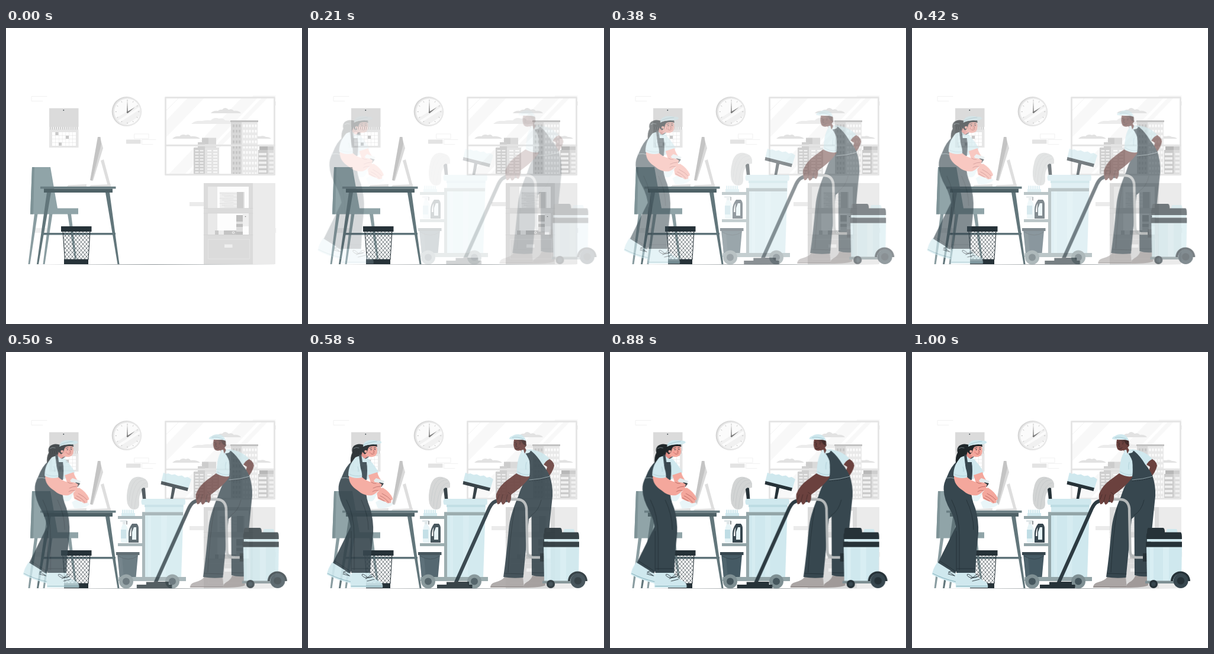
Recreate the animation shown at these times as an HTML page with a canvas. Size 500 px wide and 500 px high, loop 1040 ms.

```html
<!DOCTYPE html>
<html lang="en">
<head>
<meta charset="utf-8">
<title>Office cleaning</title>
<style>
html, body { margin: 0; width: 100%; height: 100%; overflow: hidden; background: #fff; }
canvas { display: block; width: 500px; height: 500px; }
</style>
</head>
<body>
<canvas id="stage"></canvas>
<script>
const SIZE = 500, LOOP = 1040, SHIFT = 22;
const scale = window.devicePixelRatio || 1;
const INK = '#263238', SLATE = '#37474f', SEAM = '#222f35', BLUE = '#cfe8ee', PALE = '#d8eef3',
  STEEL = '#93a5a8', PINK = '#f4a79c', ROSE = '#e58f88', BROWN = '#6b413e', UMBER = '#432b2a', SHOE = '#aaa5a4';
let c;

const fill = (color, d) => { c.fillStyle = color; c.fill(new Path2D(d)); };
const box = (color, x, y, x2, y2) => { c.fillStyle = color; c.fillRect(x, y, x2 - x, y2 - y); };
const disc = (color, x, y, r) => { c.fillStyle = color; c.beginPath(); c.arc(x, y, r, 0, 7); c.fill(); };
const line = (color, w, d) => { c.strokeStyle = color; c.lineWidth = w; c.stroke(new Path2D(d)); };
const frame = (color, w, x, y, x2, y2) => { c.strokeStyle = color; c.lineWidth = w; c.strokeRect(x, y, x2 - x, y2 - y); };
function grid(color, x, y, cols, rows, dx, dy, w, h) {
  for (let i = 0; i < cols; i++)
    for (let j = 0; j < rows; j++) box(color, x + i * dx, y + j * dy, x + i * dx + w, y + j * dy + h);
}
function clipped(d, draw) {
  c.save(); c.clip(new Path2D(d)); draw(); c.restore();
}
function prepare(canvas) {
  canvas.width = canvas.height = SIZE * scale;
  const ctx = canvas.getContext('2d');
  ctx.scale(scale, scale);
  ctx.lineCap = ctx.lineJoin = 'round';
  return ctx;
}
function layer(...parts) {
  const canvas = document.createElement('canvas');
  c = prepare(canvas);
  parts.forEach(part => part());
  return canvas;
}

function calendar() {
  box('#dbdbdb', 73, 135.5, 122.5, 167);
  box('#e6e6e6', 73, 171, 122.5, 202);
  box('#f2f2f2', 73, 167, 122.5, 171);
  grid('#c7c7c7', 74, 167, 14, 1, 3.5, 1, 1.5, 4.5);
  grid('#fff', 78, 176, 7, 4, 5.8, 5.9, 5.2, 5.3);
  box('#c7c7c7', 83.5, 176, 88.5, 181);
  box('#c7c7c7', 101, 182, 106, 187);
  box('#c7c7c7', 89, 193.5, 94, 198.7);
  disc(INK, 97.3, 138.8, .9);
}

function clock() {
  disc('#d6d6d6', 203.6, 141, 25);
  disc('#e8e8e8', 205, 141.4, 24.2);
  disc('#fbfbfb', 205, 141.4, 22);
  clipped('M183 141.4a22 22 0 1 0 44 0a22 22 0 1 0-44 0', () => {
    line('#f1f1f1', 5, 'M182 158L226 130');
    line('#f1f1f1', 9, 'M190 166L234 138');
  });
  for (let i = 0; i < 12; i++) {
    const a = i * Math.PI / 6, x = Math.cos(a), y = Math.sin(a);
    line('#b5b5b5', .8, `M${205 + x * 18.5} ${141.4 + y * 18.5}L${205 + x * 20} ${141.4 + y * 20}`);
  }
  fill('#8a8a8a', 'M204 143L205 121.5L206 143Z');
  fill('#777', 'M204.2 142L217.5 134L205.5 144Z');
  disc('#777', 205, 142.5, 1.2);
}

function city() {
  box('#ccc', 331, 185.5, 342, 198); box('#dadada', 342, 185.5, 355, 198);
  box('#cfcfcf', 324, 193, 336, 203); box('#dedede', 336, 196, 355, 203);
  box('#cfcfcf', 317, 202, 336.5, 247); box('#e3e3e3', 336.5, 202, 360, 247);
  grid('#efefef', 319.5, 206, 2, 8, 8, 5.2, 6, 2.4);
  grid('#f8f8f8', 340, 206, 2, 8, 10, 5.2, 7, 2.4);

  box('#d8d8d8', 380, 158, 398, 247); box('#e9e9e9', 398, 158, 425, 247);
  box('#c2c2c2', 379, 156, 426, 159);
  grid('#c6c6c6', 383, 163, 3, 10, 5, 9, 3, 4.5);
  grid('#fbfbfb', 400.5, 163, 5, 10, 5, 9, 3, 4.5);

  box('#b8b8b8', 428, 200, 442, 207); box('#cecece', 442, 200, 452, 207);
  box('#cacaca', 426, 206, 442, 247); box('#dcdcdc', 442, 206, 452, 247);
  grid('#f0f0f0', 427, 211, 1, 5, 1, 7.3, 13, 4);
  grid('#f0f0f0', 444.5, 211, 1, 5, 1, 7.3, 7.5, 4);
}

function windowPane() {
  clipped('M268 116H455V249H268Z', () => {
    fill('#f8f8f8', 'M309 116H337L268 187V159Z');
    fill('#f8f8f8', 'M400 116H427L300 249H273Z');
    fill('#f8f8f8', 'M434 116H444L316 249H306Z');
    line('#f3f3f3', 1, 'M268 142L294 116');
    fill('#e2e2e2', 'M346 144Q350 139 358 140Q362 137 365 138Q370 132 376 138Q382 136 385 140Q393 139 397 144Z');
    fill('#ececec', 'M313 162Q319 156 331 157Q340 155 346 156Q351 150 360 153Q367 151 370 156Q384 156 392 162Z');
    fill('#e2e2e2', 'M281 187Q286 182 293 183Q297 178 304 181Q309 178 312 183Q322 182 328 187Z');
    fill('#e2e2e2', 'M418 187Q422 182 429 183Q435 181 439 184Q445 184 448 187Z');
    city();
  });
  frame('#e6e6e6', 3, 269.5, 117.5, 453.5, 247.8);
  box('#e4e4e4', 268, 196.8, 455, 199.8);
  box('#f2f2f2', 455, 124, 456.2, 131);
}

function cabinet() {
  box('#dbdbdb', 334, 262, 417, 399); box('#ebebeb', 417, 262, 455, 399);
  box('#fdfdfd', 341, 268, 410, 304.5); box('#e9e9e9', 341, 268, 357, 304.5);
  box('#fdfdfd', 341, 313, 410, 349); box('#e9e9e9', 341, 313, 357, 349);
  box('#efefef', 361, 277, 390, 304.5);
  for (let i = 0; i < 9; i++) line('#d6d6d6', .6, `M${361 + i % 3 * 4} ${279 + i * 2.9}L${390 - i % 2 * 6} ${280 + i * 2.9}`);
  box('#cdcdcd', 390, 277, 401, 304.5); box('#e4e4e4', 401, 277, 403, 304.5);
  box('#c9c9c9', 353, 342, 359, 349); box('#ececec', 359, 342, 368, 349);
  box('#c4c4c4', 368, 342, 389, 349);
  disc('#fafafa', 384, 345.5, 2); disc('#aaa', 384, 345.5, 1);
  box('#bfbfbf', 389, 316, 400, 349); box('#e2e2e2', 389, 327, 400, 331); box('#ddd', 389, 336, 400, 344);
  box('#efefef', 400, 314, 410, 335); disc('#777', 404.5, 318.5, .8);
  line('#d0d0d0', .6, 'M334 304.5H417M334 313H417M334 349.5H417');
  frame('#e6e6e6', .8, 342, 357, 411.5, 390);
  box('#efefef', 369, 365.5, 382.5, 371);
  box('#f0f0f0', 455, 338, 456.2, 346);
}

function bricks() {
  line('#f1f1f1', 1, 'M69 115.5H43V123.5H62');
  frame('#f1f1f1', 1, 217, 179, 241, 187);
  line('#f1f1f1', 1, 'M253 188.5H229.5V196.5H248');
  box('#e3e3e3', 203, 188.5, 227.5, 195.5);
  box('#ebebeb', 310, 294, 334, 301);
  box('#efefef', 48, 338, 70, 346);
  line('#efefef', 1, 'M417 115H455');
}

function chair() {
  fill('#8a9da1', 'M48 314H53.5L40.5 399H37.5ZM73 314H78.5L65.5 399H62.5ZM104 314H110L119 390H116Z');
  fill('#90a4a8', 'M44 235H75L87 304.5H122V314.5H41Z');
  fill('#7e9397', 'M44 235H48L46 314.5H41Z');
}

function desk() {
  fill('#dedede', 'M160 224L165 222L177 267H172Z');
  fill('#dadada', 'M158.5 184L164 203L147 258L143 257Z');
  fill('#c4c4c4', 'M155 184H159.5L161 196L145.5 258L142 257Z');
  fill('#e0e0e0', 'M141 268L143 265.5L177 264V268ZM103 268L105 265.5L136 264V268Z');
  box('#5f747a', 62, 346, 185, 349.5);
  fill('#62767b', 'M69 278H76L55 399H52ZM168 278H175L191.5 399H188.5Z');
  box('#6a7e83', 58, 267.8, 185.5, 271.5);
  box('#4f6267', 64, 271.5, 180, 278);
}

function bin() {
  clipped('M96 344H142L139 391H99Z', () => {
    for (let x = 40; x < 200; x += 6) line(INK, .65, `M${x} 344l47 55M${x} 344l-47 55`);
  });
  line(INK, 1, 'M96 344L99.5 391M142 344L139 391');
  box(INK, 93, 335, 144.5, 344);
  box(INK, 98, 390.5, 139, 399);
}

function room() {
  box('#fff', 0, 0, SIZE, SIZE);
  bricks(); windowPane(); calendar(); clock(); cabinet();
  fill(INK, 'M40 399.25L250 399L462 399.25L250 399.6Z');
  chair(); desk(); bin();
}

function wheel(x, y, r, color, hub) {
  disc(color, x, y, r); disc(hub, x, y, r * .5);
}

function cart() {
  // mop and broom
  fill('#d2d4d4', 'M240 222Q238 213 226 211Q212 209 207 225Q202 243 205 256Q209 267 218 266Q226 265 225 254Q224 243 229 236Q232 230 240 229Z');
  line('#bfc3c4', .6, 'M235 216Q214 215 212 261M237 221Q221 222 217 264M228 213Q211 214 208 252');
  fill(INK, 'M229 232Q231 228 235 230L236.5 249H231Z');
  fill(INK, 'M281 227L286.5 228L282 249H277.5Z');
  fill(BLUE, 'M266 203.5L270 206L274 205L280 207.5L285 206.5L291 209.5L297 208.5L302 212L307 211L313 215L308 231L262 220Z');
  fill(INK, 'M262.5 218L308 229.5L306.5 235L261.5 223.5Z');
  // barrel
  fill(BLUE, 'M235 258H300L296 381H235Z');
  fill('#d6ecf1', 'M240 276H245V381H240ZM262 276H272L270 381H262Z');
  box('#bddce3', 234, 258, 299.5, 262);
  fill(BLUE, 'M230 248H302Q304 253 302 258H230Q227 253 230 248Z');
  box(STEEL, 230, 270.5, 299, 276); box(STEEL, 230, 270.5, 235, 381);
  // shelves
  box(STEEL, 189, 277, 230, 282); box(STEEL, 189, 323, 230, 328);
  box(BLUE, 195, 272, 218, 277);
  grid(BLUE, 196, 266.5, 7, 1, 3, 1, 2, 6);
  fill('#e6f4f7', 'M197 291H202Q206 297 207 304V320Q207 322 205 322H196Q194 322 194 320V304Q194 297 197 291Z');
  box('#bfdde5', 194, 300, 203, 315);
  fill('#dfe6e8', 'M193 284H204L206 287H202V291H197V287H193Z');
  line(INK, 1, 'M204 286V291');
  fill(SLATE, 'M213 290H221Q224 293 224 298V322H207V306Q207 298 213 290Z');
  fill('#e6f4f7', 'M216 296H220V317H213V304Z');
  fill('#fff', 'M212.5 296Q209 301 209 311H211.5V303Z');
  // bucket
  fill('#455a64', 'M188 342H223L219.5 381H192Z');
  fill('#4f646d', 'M190 346H196L199 381H192Z');
  box(SLATE, 186, 338, 225.5, 343);
  line(SLATE, 1, 'M190 345Q207 355 222 345');
  box(STEEL, 190, 380, 304, 387);
  wheel(203, 387.5, 12, '#7e8f93', '#46575e');
  wheel(281, 387.5, 12, '#7e8f93', '#46575e');
}

function vacuum() {
  line('#b4b8b9', 4.4, 'M336 249H351Q365 249 367 264L368.5 336Q368.5 347 379 347H394');
  box(INK, 390, 340, 398, 354);
  fill(BLUE, 'M396 328H456L455 387H397Z');
  fill(PALE, 'M402 330H408V386H402ZM424 330H434V386H424Z');
  fill(INK, 'M399 297H424Q427 297 427 305H397Q397 299 399 297Z');
  fill(BLUE, 'M431 299H447L449 305H429Z');
  fill(INK, 'M398 304.5H454Q456 305 456 316H396Q395 306 398 304.5Z');
  box(BLUE, 397, 316, 455, 320.5);
  box(INK, 395, 320.5, 456, 329.5);
  box('#7e8f93', 394, 386.5, 446, 391);
  wheel(408, 392, 7, INK, SLATE);
  fill(INK, 'M437 387A16.5 16.5 0 0 1 470 387H466A12.5 12.5 0 0 0 441 387Z');
  wheel(454, 386.5, 12.5, SLATE, INK);
}

function wand() {
  line('#2d3b42', 6, 'M247.5 390L304 264Q310 251 322 250.5H334');
  box(INK, 216, 393, 275.5, 399); box(INK, 232, 388.5, 263, 394); box(INK, 247, 388, 270, 393);
}

function man() {
  // far arm and shoes
  fill(BROWN, 'M399 177Q413 183 414 192Q412 202 402 214L396 210Q401 200 402 194L393 188Z');
  fill(BLUE, 'M372 164Q396 168 406 181Q400 183 395 192L382 184Z');
  fill('#a09a99', 'M377 378H397L399 394Q392 398 362 398Q361 393 367 389Q375 385 377 378Z');
  fill(SHOE, 'M330 380H361L363 398H306Q306 391 314 389Q326 386 330 380Z');
  line('#8b8584', 1, 'M307 396.5H362');
  // trousers
  fill(SLATE, 'M372 210L406 208Q412 226 411 244Q406 290 398 379Q386 380 376 377L375.5 278L371 282L361.5 381Q344 383 328 380Q333 345 337 300Q339 276 353 244Q362 216 372 210Z');
  line(SEAM, .8, 'M347 264Q339 310 336 372M330 374L362 375M377 373L398 373M375 276Q388 268 392 250');
  // shirt and bib
  fill(BLUE, 'M359 168Q365 163 374 165Q385 169 387 186L378 210H350Q351 180 359 168Z');
  fill(SLATE, 'M362 167L366 166L375 167Q386 176 394 190Q402 199 407 211Q392 213 371 217Q374 198 372 184Q369 175 362 167Z');
  line('#9fb0b5', .8, 'M372 216Q390 215 407 210');
  c.setLineDash([2, 2]); line(INK, .8, 'M372 218Q390 217 407 212'); c.setLineDash([]);
  fill(BLUE, 'M358 170Q366 175 369 186Q374 196 372 210Q360 212 351 205Q351 180 358 170Z');
  line('#a4c7d0', .7, 'M352 202Q361 209 372 207M367 186Q365 192 366 198');
  // head
  fill(UMBER, 'M361 148H365L367 158L363 163Z');
  fill(BROWN, 'M346 148Q344 157 347 164Q350 168 357 166L359 169L364 172L367 166L364 161Q368 157 365 152L362 149Z');
  fill(UMBER, 'M348 149L365 148Q368 153 365 158Q360 155 359 151Z');
  line(UMBER, 1, 'M347 152.5L350 152M355 152L358 153M350 155L349 159L351 159.5M349 163Q352 164 355 162');
  disc('#241817', 349.5, 155, .7); disc('#241817', 356, 155, .7);
  fill(PALE, 'M358 166L362 165L364 172L360 174ZM364 172L367 165L374 167L372 170Z');
  fill(BLUE, 'M343 142Q347 138.5 354 139Q364 140 366 150Q357 146 345 148L338 147Q338 143 343 142Z');
  line('#9cc3cd', .8, 'M343 144.5Q352 142.5 362 147');
}

function grip() {
  fill(BROWN, 'M350 205Q361 212 373 210Q365 224 341 241Q342 250 338 255Q334 254 333 249Q332 256 327 258Q325 256 324 252Q322 258 318 257Q315 248 316 240Q321 226 335 216Z');
  line(UMBER, .8, 'M333 249L335 241M324 252L327 241M318 249L321 241M341 241L336 237');
}

function woman() {
  // rear foot and leg
  fill(BLUE, 'M43 355L75 375L74 391Q50 385 34 376Q35 366 43 355Z');
  line('#7ba9b4', .9, 'M35 374Q52 383 74 388');
  line(INK, .9, 'M62 371l10 7M61 375l11 3M66 370q7-3 8 1q-2 4-8-1q-7 2-3 4');
  fill(SLATE, 'M60 250Q71 270 75 293L44 356L73 374L92 330L97 280Z');
  // front foot and leg
  fill(BLUE, 'M76 373H106Q111 382 124 388Q129 391 128 398H74Q73 385 76 373Z');
  line('#7ba9b4', .9, 'M75 395.5H128');
  line(INK, .9, 'M99 383l11-4M102 387l12-3M103 381q-10-9-10-4q3 5 10 4q8-9 10-4q-2 5-10 4');
  fill(SLATE, 'M77 184Q66 192 59 211Q53 222 53.5 232Q54 249 65 268Q73 282 75 303L75 373H107Q108 340 112 306Q113 285 107 264Q98 244 100 218L92 190Z');
  line(SEAM, .8, 'M67 250Q80 275 80 312V368M75 303V370M76 366H107M92 250Q104 275 104 300M47 353L73 370');
  // ponytail
  fill('#1f2629', 'M97 157Q86 153 79 159Q75 164 77 170Q73 177 74 188Q83 187 88 179Q96 177 98 168Z');
  line('#8f9ea3', .7, 'M79 163Q83 160 88 162');
  // torso
  fill(BLUE, 'M82 178Q90 173 102 178Q114 190 121 203L103 215L72 211Q73 188 82 178Z');
  fill(SLATE, 'M88 174L92 173L94 186H101Q103 200 101 216H84Q91 205 90 191Z');
  line('#9fb0b5', .8, 'M57 213Q66 211 74 214');
  fill(BLUE, 'M101 184Q113 190 121 204Q114 208 104 208Z');
  // neck and head
  fill(ROSE, 'M94 168L104 172L102 179L97 180L92 175Z');
  fill(PINK, 'M97 160L117 157Q121 170 116 175Q110 179 103 176Q97 174 95 168Z');
  fill('#1f2629', 'M95 158L118 155L119 160Q112 158 106 160Q103 162 102 169L98 173L94 169Z');
  disc(PINK, 99.5, 168, 2.3);
  disc(INK, 108.5, 165, .9); disc(INK, 115, 164.5, .9);
  line(INK, .8, 'M106 162.5l4-.8M113 162l3-.4');
  line('#a64e4b', .8, 'M112 165l2 4l-2 .5M108 171.5Q111 174 114 171');
  disc('#ee918c', 106.5, 169.5, 1.6);
  fill(BLUE, 'M95 160Q95 151 105 149Q113 148 118 150Q125 149 126.5 153Q121 157 113 156Q102 156 95 160Z');
  line('#9cc3cd', .8, 'M96 157Q105 152 118 151');
  // cloth, bottle and hands
  fill(PINK, 'M104 208L119 203Q121 212 129 221L123 232L108 221Z');
  fill('#e9f5f8', 'M116 254Q125 246 138 250L146 257Q139 265 120 264Z');
  fill(PINK, 'M118 238L128 229Q140 236 145 247Q145 251 142 250Q144 256 139 255Q137 257 133 253Q128 252 120 248Z');
  line('#aa5753', .7, 'M127 239Q137 244 142 250M124 243Q133 247 138 254M121 246L131 252');
  fill('#e6f4f7', 'M118 221L124 226L115 247Q111 255 103 251Q100 248 103 242Z');
  fill('#e0e9eb', 'M113 217L117 213L131 218L129 222L120 221L117 224Z');
  fill(INK, 'M122 220L130 222L126 228Z');
  fill(PINK, 'M71 209Q80 213 92 210Q98 217 109 220Q119 219 126 223Q128 226 124 227L127 231Q126 235 121 234Q117 239 110 242Q97 244 86 234Q70 224 71 209Z');
  line('#aa5753', .7, 'M124 227Q117 227 112 230M121 234Q115 233 111 236M109 220Q113 223 117 222');
  fill(BLUE, 'M82 179Q90 185 91 197Q94 206 93 212Q80 215 70 209Q70 190 82 179Z');
  line('#a4c7d0', .7, 'M71 206Q81 211 92 209M86 194Q88 198 87 202');
  line('#2e3c42', 1.2, 'M104 177L99 180');
}

const layers = {
  room: layer(room), cart: layer(cart), left: layer(woman), right: layer(man, vacuum, wand, grip)
};

const bez = (s, a, b) => 3 * a * s * (1 - s) ** 2 + 3 * b * s * s * (1 - s) + s ** 3;
function ease(x) {
  let lo = 0, hi = 1;
  for (let i = 0; i < 24; i++) {
    const mid = (lo + hi) / 2;
    if (bez(mid, .36, .5) < x) lo = mid; else hi = mid;
  }
  return bez(hi, -.01, 1.38);
}

// 24 pictures a second, each start rounded to 10 ms
function step(t) {
  let n = 24;
  while (n && Math.round(n * 25 / 6) * 10 > t) n--;
  return n;
}

const ctx = prepare(document.getElementById('stage'));
function put(image, x = 0) { ctx.drawImage(image, x, 0, SIZE, SIZE); }
const start = performance.now();
function draw() {
  const n = step((performance.now() - start) % LOOP);
  const p = n < 3 ? 0 : ease((n + 1) / 25);
  ctx.globalAlpha = 1;
  put(layers.room);
  ctx.globalAlpha = Math.max(0, Math.min(1, p));
  put(layers.cart);
  put(layers.right, SHIFT * (1 - p));
  put(layers.left, -SHIFT * (1 - p));
  requestAnimationFrame(draw);
}
draw();
</script>
</body>
</html>
```
